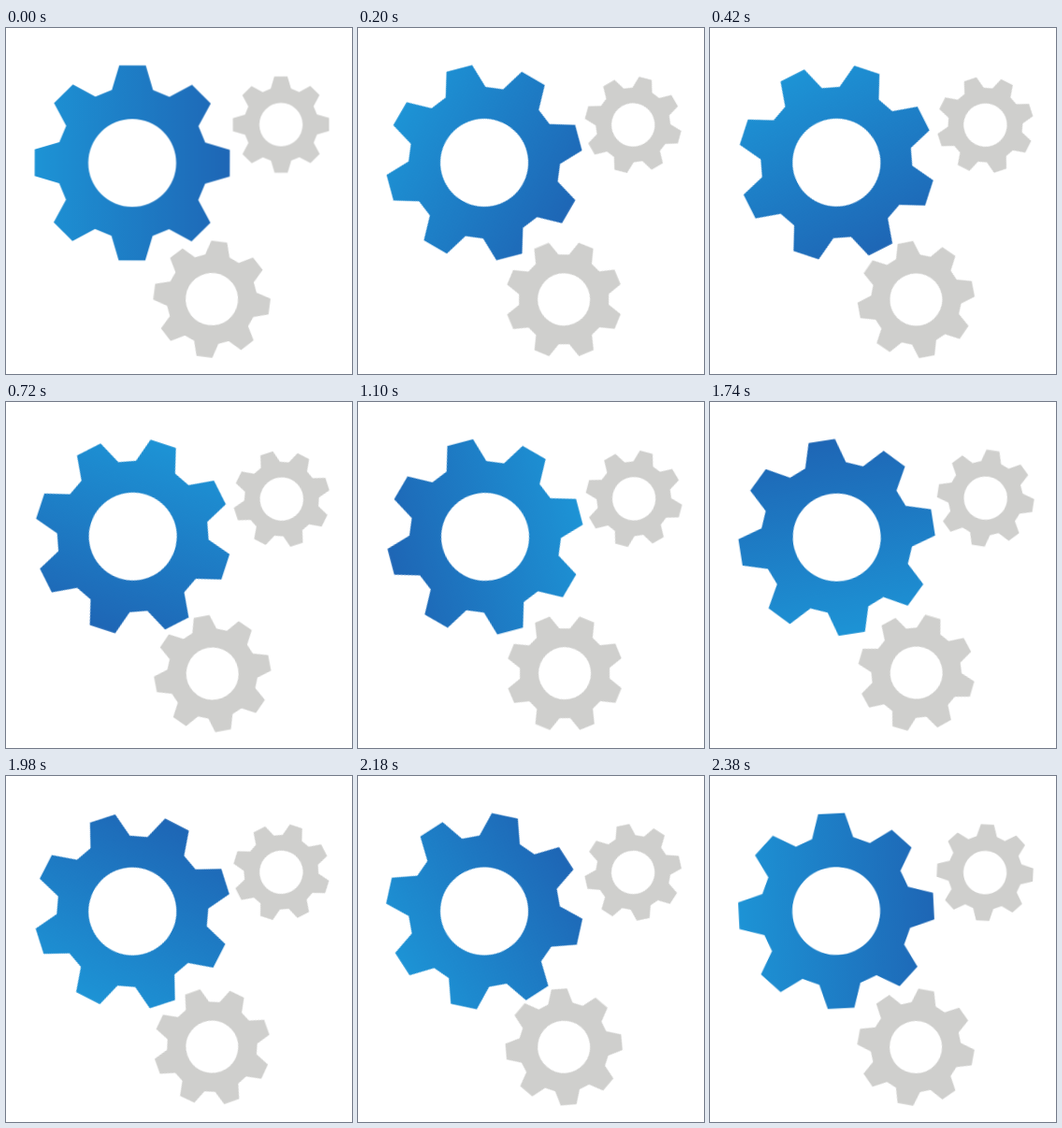
Write an HTML page that moves like this. It is 370 by 370 pixels and loops after 2400 ms.

```html
<!DOCTYPE html>
<html lang="en">
<head>
<meta charset="utf-8">
<title>Gears</title>
<style>
  html, body { margin: 0; width: 100%; height: 100%; overflow: hidden; background: #fff; }
  svg { display: block; width: 100vw; height: 100vh; }
</style>
</head>
<body>
<svg viewBox="0 0 370 370">
  <defs>
    <linearGradient id="blue" gradientUnits="userSpaceOnUse" x1="-104" y1="0" x2="104" y2="0">
      <stop offset="0" stop-color="#1d93d5"/>
      <stop offset="1" stop-color="#1e66b5"/>
    </linearGradient>
  </defs>
</svg>
<script>
const NS = 'http://www.w3.org/2000/svg';
const svg = document.querySelector('svg');
const LOOP = 2400, TEETH = 8, HOLE = 47, WOBBLE = -0.5;

// One tooth pointing up: base, tip, tip, base.
const tooth = [[-22, -78], [-14.2, -104.3], [14.2, -104.3], [22, -78]];

function gearPath() {
  const points = [];
  for (let i = 0; i < TEETH; i++) {
    const a = i * 2 * Math.PI / TEETH, c = Math.cos(a), s = Math.sin(a);
    for (const [x, y] of tooth) {
      points.push((x * c - y * s).toFixed(2) + ' ' + (x * s + y * c).toFixed(2));
    }
  }
  const arc = `a${HOLE} ${HOLE} 0 1 0 `;
  return `M${points.join('L')}ZM${-HOLE} 0${arc}${2 * HOLE} 0${arc}${-2 * HOLE} 0Z`;
}

function add(parent, tag, attrs) {
  const el = document.createElementNS(NS, tag);
  for (const key in attrs) el.setAttribute(key, attrs[key]);
  return parent.appendChild(el);
}

const gears = [
  { x: 135.5, y: 144.3, scale: 1, phase: 0, turn: 360, fill: 'url(#blue)' },
  { x: 294.6, y: 103.3, scale: 0.493, phase: 0, turn: -360, fill: '#cfcfcd' },
  { x: 220.6, y: 290, scale: 0.596, phase: 7.5, turn: -360, fill: '#cfcfcd' }
];

const shape = gearPath();
for (const { x, y, scale, phase, turn, fill } of gears) {
  const place = add(svg, 'g', { transform: `translate(${x} ${y})` });
  const spin = add(place, 'g', {});
  spin.style.transformOrigin = '0 0';
  // The axle sits slightly off the gear's centre.
  add(spin, 'path', {
    d: shape, fill, 'fill-rule': 'evenodd',
    transform: `translate(${WOBBLE} 0) rotate(${phase}) scale(${scale})`
  });
  const anim = spin.animate(
    [{ transform: 'rotate(0deg)' }, { transform: `rotate(${turn}deg)` }],
    { duration: LOOP, iterations: Infinity, easing: 'linear' }
  );
  anim.startTime = 0;
}
</script>
</body>
</html>
```
